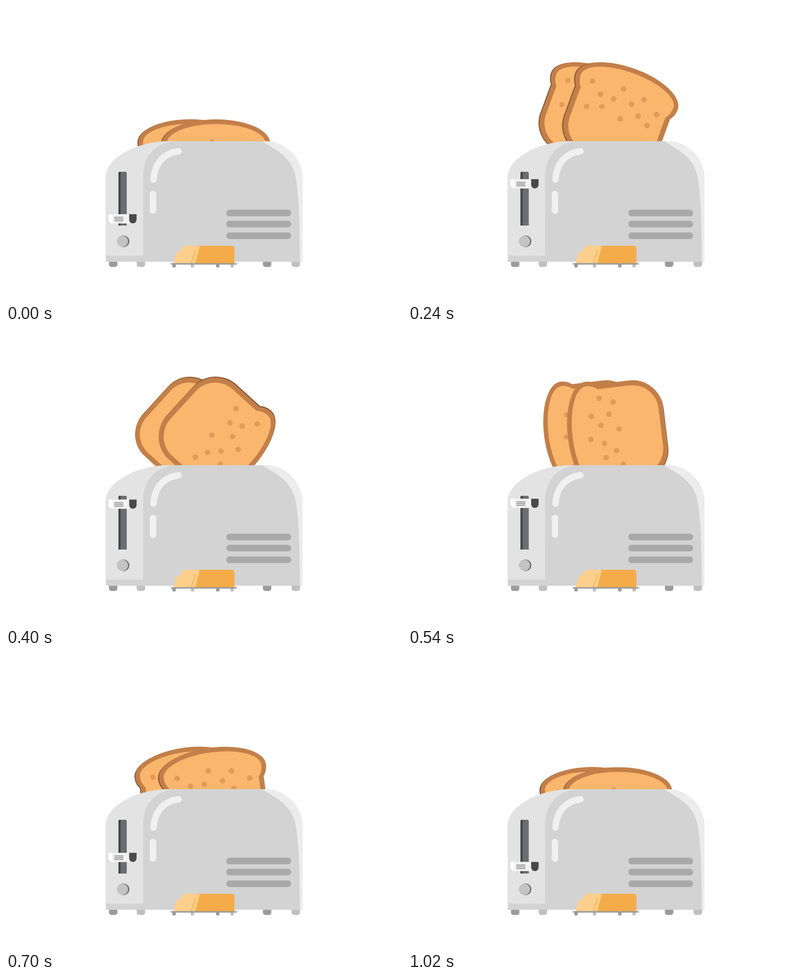
Animation of 800 by 600 pixels, one loop 1040 ms. Source, as an HTML page with a canvas:

```html
<!DOCTYPE html>
<html lang="en">
<head>
<meta charset="utf-8">
<title>Toaster</title>
<style>
html, body { margin: 0; width: 100%; height: 100%; overflow: hidden; background: #fff; }
canvas { display: block; width: 800px; height: 600px; }
</style>
</head>
<body>
<canvas id="stage" width="800" height="600"></canvas>
<script>
const ctx = document.getElementById('stage').getContext('2d');
const LOOP = 1040, STEP = 20;

// ---------- timing ----------
const decay = (t, k, span) => (1 - Math.exp(-k * t)) / (1 - Math.exp(-k * span));

function leverY(t) {
  const p = t < 540 ? decay(t, 0.0088, 540) : 1 - decay(t - 540, 0.0088, 540);
  return 422 - 80 * p;
}

function toastY(t) {
  const p = t < 575 ? decay(t, 0.00865, 575) : 1 - decay(t - 575, 0.00865, 465);
  return 330.8 - 123.3 * p;
}

// One full turn; the time handles give a slightly longer ease-out.
function spin(t) {
  const [a, b, c, d] = [140, 390, 508, 765];
  if (t <= a) return 0;
  if (t >= d) return 2 * Math.PI;
  let lo = 0, hi = 1;
  for (let i = 0; i < 30; i++) {
    const s = (lo + hi) / 2, r = 1 - s;
    const x = r * r * r * a + 3 * r * r * s * b + 3 * r * s * s * c + s * s * s * d;
    if (x < t) lo = s; else hi = s;
  }
  return 2 * Math.PI * lo * lo * (3 - 2 * lo);
}

// ---------- drawing helpers ----------
function fill(path, color) {
  ctx.fillStyle = color;
  ctx.fill(typeof path === 'string' ? new Path2D(path) : path);
}

function box(x, y, w, h, radius, color) {
  const p = new Path2D();
  p.roundRect(x, y, w, h, radius);
  fill(p, color);
}

function disc(x, y, r, color) {
  const p = new Path2D();
  p.arc(x, y, r, 0, 7);
  fill(p, color);
}

function line(path, width, color) {
  ctx.lineWidth = width;
  ctx.lineCap = 'round';
  ctx.strokeStyle = color;
  ctx.stroke(new Path2D(path));
}

// ---------- toast ----------
// Slice outline around its pivot: half widths of dome and sides, dome height, base.
function slice(dome, side, rise, base, r) {
  const cx = 1, mid = -53, notch = -29.5, p = new Path2D();
  p.moveTo(cx - dome, mid);
  p.ellipse(cx, mid, dome, rise, 0, Math.PI, 2 * Math.PI);
  p.bezierCurveTo(cx + dome, mid + 11, cx + dome - 4, notch - 5, cx + side, notch);
  p.arcTo(cx + side, base, cx, base, r);
  p.arcTo(cx - side, base, cx - side, notch, r);
  p.lineTo(cx - side, notch);
  p.bezierCurveTo(cx - dome + 4, notch - 5, cx - dome, mid + 11, cx - dome, mid);
  p.closePath();
  return p;
}

const crust = slice(109, 101, 48, 97.5, 62);
const crumb = slice(99.5, 91, 38.5, 88, 53);
const specks = [
  [-71.5, -48.5], [-7.5, -55], [39, -48.5], [-47.5, -29], [-19, -29], [18.5, -31.5],
  [73.5, -29], [-36, -6.5], [39, -13], [62.5, -1.5], [-65.5, 4], [7, 4]
];

function toast(x, y, scale, angle) {
  ctx.save();
  ctx.translate(x, y);
  ctx.rotate(angle);
  ctx.scale(scale, scale);
  ctx.save();
  ctx.translate(-2.2, 0.7);
  fill(crust, '#8c5a32');
  ctx.restore();
  fill(crust, '#c27f4a');
  fill(crumb, '#f9b66c');
  for (const [sx, sy] of specks) disc(sx, sy, 5.6, '#e39a58');
  ctx.restore();
}

// ---------- toaster ----------
function foot(x, y, w, h, color) {
  box(x, y, w, h, [0, 0, w * 0.3, w * 0.3], color);
}

function body() {
  const dark = '#9b9b9b', pale = '#c0c0c0';
  foot(208, 517, 17, 12, dark);
  foot(264, 517, 17, 12, pale);
  foot(519, 517, 17, 12, dark);
  foot(577, 517, 17, 12, pale);

  // shell, left panel, front, right sheen
  fill('M201.5 518.5V345C203 310 262 274 330 274H527C565 276 599 308 599 350V518.5Z', '#d3d3d3');
  fill('M201.5 506V345C203 310 262 274 330 274H347C308 274 277 300 277 345V506Z', '#e3e3e3');
  fill('M518 274H527C565 276 599 308 599 350V518.5H594C593 400 590 362 582 335C570 300 540 290 518 274Z', '#ececec');

  line('M298 352C300 320 318 298 348.5 294.5', 13, '#f0f0f0');
  line('M297 381V415', 13, '#f0f0f0');
  for (const y of [412.8, 435.3, 459]) box(445, y, 131, 13.4, 6.7, '#a9a9a9');

  box(227.3, 336, 16.7, 109, [3, 3, 0, 0], '#6b6d6e');
  box(227.3, 336, 4.2, 109, [3, 0, 0, 0], '#434647');

  disc(237.3, 477, 11.8, '#6b6b6b');
  disc(235.2, 477, 11.3, '#c3c3c3');
}

function lever(y) {
  box(207, y, 42, 18.6, [0, 0, 0, 9], '#ffffff');
  box(214.5, y, 34.5, 18.6, [0, 0, 0, 5], '#f2f2f2');
  box(248.8, y, 15, 18.6, [0, 0, 7.5, 7.5], '#4a4a4a');
  for (const d of [5.2, 8.7, 12.2]) box(218.7, y + d, 18.5, 2.3, 0.6, '#a0a0a0');
}

function butter() {
  foot(336, 523, 7, 7, '#9b9b9b');
  foot(373.3, 523, 7, 7, '#c0c0c0');
  foot(424.3, 523, 7, 7, '#9b9b9b');
  foot(453.3, 523, 7, 7, '#c0c0c0');
  box(378, 486, 83.5, 36, [0, 5, 0, 0], '#f4ac4a');
  fill('M338 522L343.5 505Q346 496 354 495.5Q356 486 362 486H387Q392 486 390.5 491L382 522Z', '#fdcf8d');
  line('M374 521L381.6 500Q382.8 496.5 379.5 495.5', 1.5, '#f4ac4a');
  box(333, 521.2, 133.5, 3, 1, '#9b9b9b');
}

function draw(t) {
  const y = toastY(t), angle = spin(t);
  ctx.fillStyle = '#fff';
  ctx.fillRect(0, 0, 800, 600);
  toast(371.3, y - 4.3, 0.96, angle);
  toast(423.5, y, 1, angle);
  body();
  lever(leverY(t));
  butter();
}

const start = performance.now();
function tick() {
  const t = (performance.now() - start) % LOOP;
  draw(Math.floor(t / STEP) * STEP);
  requestAnimationFrame(tick);
}
tick();
</script>
</body>
</html>
```
